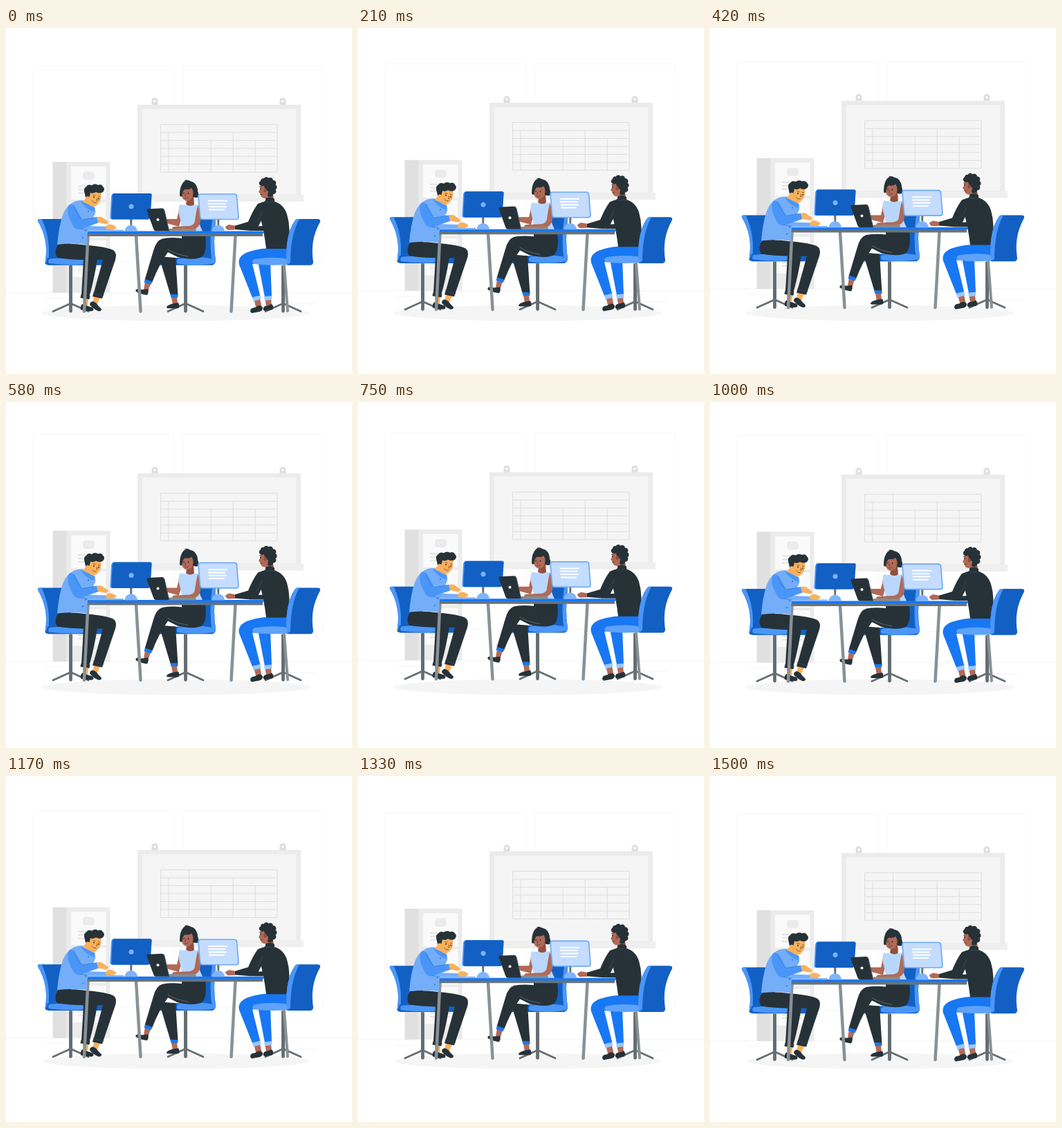
An HTML page that plays this animation: 500 px wide and 500 px high, repeating every 1.54 s.

```html
<!DOCTYPE html>
<html lang="en">
<head>
<meta charset="utf-8">
<title>Team at work</title>
<style>
html,body{margin:0;width:100%;height:100%;overflow:hidden;background:#fff}
svg{display:block;width:100vw;height:100vh}
.ink{fill:#263238}.deep{fill:#1260c3}.blue{fill:#1877f2}.mid{fill:#4a96f8}.soft{fill:#74adf8}.pale{fill:#b9d7fd}
.tan{fill:#f8b15d}.brown{fill:#b06a57}.dusk{fill:#91503f}.steel{fill:#68737a}
.line{fill:none;stroke-linecap:round;stroke-linejoin:round}
</style>
</head>
<body>
<svg viewBox="0 0 500 500">
<defs>
  <g id="foot" class="line" stroke="#646e73">
    <path d="M0 343V399" stroke-width="5" stroke-linecap="butt"/>
    <path d="M0 398L-25.500 409.500M0 398L25.500 409.500" stroke-width="2.800"/>
    <path d="M0 396V409" stroke-width="4.800"/>
  </g>
  <g id="hook">
    <path d="M-4.500 111V105.500a4.500 4.500 0 0 1 9 0V111Z" fill="#dedede"/>
    <circle cy="105.800" r="1.800" fill="#fff"/>
  </g>
  <g id="stand">
    <path d="M-1.500 272h3.500l-.5 17h-2.500Z" class="steel"/>
    <path d="M-9 294a9 9 0 0 1 18.500 0Z" fill="#80b4fb"/>
  </g>
</defs>
<rect width="500" height="500" fill="#fff"/>
<ellipse cx="245.500" cy="412" rx="193.500" ry="11.300" fill="#f5f5f5"/>
<g id="scene">
  <!-- room -->
  <g fill="none" stroke="#f8f8f8">
    <rect x="39" y="54.500" width="203.500" height="283" rx="3"/>
    <rect x="255" y="54.500" width="203.500" height="283" rx="3"/>
    <path d="M0 382.600H500" stroke="#f3f3f3"/>
    <path d="M56 390.500H84M407 398.500H448M188 394.500H206" stroke="#f5f5f5"/>
  </g>

  <!-- cabinet -->
  <path d="M67.500 193.500H88V382.500H67.500Z" fill="#e0e0e0"/>
  <path d="M87.500 193.500H150.500V382.500H87.500Z" fill="#ebebeb"/>
  <path d="M94 200h50.500v48H94ZM94 252h50.500v51H94ZM94 307h50.500v53H94Z" fill="#fafafa"/>
  <rect x="111" y="207.500" width="17" height="12" rx="4.500" fill="#ebebeb"/>
  <path d="M105 228.500h28M105 233.500h28M105 238.500h28M105 340h28M105 344.500h28M105 349.500h28" class="line" stroke="#e4e4e4" stroke-width="2"/>

  <!-- board -->
  <use href="#hook" x="215"/><use href="#hook" x="400"/>
  <path d="M190 110.800H426V242H190Z" fill="#ebebeb"/>
  <path d="M196.500 117H419.500V240.500H196.500Z" fill="#f5f5f5"/>
  <path d="M186 241H430V251H186Z" fill="#efefef"/>
  <path id="grid" fill="none" stroke="#dedede"/>

  <!-- left chair -->
  <use href="#foot" x="93.500"/>
  <path d="M49 276H82Q94 292 96 342H60Q55 342 57 336C60 316 57 298 46 279Q45 276 49 276Z" class="deep"/>
  <path d="M46 279Q45 276 49 276H51.500C61 296 64 316 61 340Q56 340 57 336C60 316 57 298 46 279Z" class="mid"/>
  <path d="M60 332H138Q144 334 143 342.800H61Q58 342 58 339Z" class="deep"/>
  <path d="M63 333.500Q88 330.500 110 333.500Q114 337 111 341.500Q86 343 62 340Q60 336 63 333.500Z" class="mid"/>

  <!-- middle chair -->
  <use href="#foot" x="259.500"/>
  <path d="M270 276H300Q304 276 303 280Q299 310 303 336Q303 341 298 342.800H222Q218 337 222 332H272Z" class="deep"/>
  <path d="M298 276H300Q304 276 303 280Q299 310 303 336Q303 340 298 341Q293 309 298 276Z" class="mid"/>
  <path d="M249 333.500Q274 329 296 333Q300 337 297 341Q272 344 248 340.500Q245 337 249 333.500Z" class="mid"/>

  <!-- left man, legs -->
  <path d="M110 384L120 386L118 401H112Z" class="tan"/>
  <path d="M127 388L136 390L131 401L125 398Z" class="tan"/>
  <path d="M110 399Q116 401 125 404Q128 407 125 409Q116 410 108 407Q107 402 110 399Z" class="ink"/>
  <path d="M125 395Q130 396 133 401L138 406Q138 410 133 409Q126 406 121 400Q121 396 125 395Z" class="ink"/>
  <path d="M76 312Q68 323 74 332Q94 335 112 335L109 386L120.500 388Q129 356 132 333Z" class="ink"/>
  <path d="M76 312Q97 311 118 314Q144 316 155 321Q161 325 158 335L140 388L126.500 384L140 335Q100 335 75 332Z" class="ink"/>
  <path d="M108.500 385L121.500 387L120.500 392L107.500 390ZM127 381L141 385L139 391L125 388Z" class="ink"/>
  <path d="M109 386L121 388M127 383L140 387" class="line" stroke="#46535a" stroke-width=".6"/>

  <!-- woman, legs -->
  <path d="M201 366L209 369L205.500 380L199 378Z" class="brown"/>
  <path d="M238.500 387L247 387L248 399L241 400Z" class="brown"/>
  <path d="M190 377Q196 379 205 377Q207 381 204 386Q195 385 188 381Q186 378 190 377Z" class="ink"/>
  <path d="M234 401Q239 398 249 397Q252 402 249 405H234Q230 404 234 401Z" class="ink"/>
  <path d="M221 330L238 387H248.500L245 332Z" class="ink"/>
  <path d="M254 300H288Q291 321 284 330Q274 337 248 331L234 324Q222 340 211 368L200.500 364L213 322Q217 307 226 304.500Q240 302 254 304Z" class="ink"/>
  <path d="M201 363L211.500 366.500L209.500 371L199.500 367.500ZM237.500 384.500L248 385L248.500 389.500H238.500Z" class="blue"/>
  <path d="M234 320Q245 327 263 330" class="line" stroke="#738087" stroke-width=".7"/>

  <!-- woman, body -->
  <path d="M251 257Q249 268 247 276L231 276Q229 281 235 283L250 287Q254 275 256 262Z" class="brown"/>
  <path d="M251 255Q263 257 278 255Q280 262 278 274Q279 287 288 300H254Q255 286 251 273Q248 264 251 255Z" class="pale"/>
  <path d="M268 224Q277 226 277 236Q279 241 278 244Q273 246 267 243Z" class="ink"/>
  <path d="M262 244H271L272 255Q267 259 260 255Z" class="dusk"/>
  <path d="M277 256Q283 268 281 280Q279 289 271 291L242 292Q238 290 242 287L266 286Q273 284 273 278L275 266Z" class="brown"/>
  <path d="M255 231H270Q272 237 270 243Q267 250 261 250Q254 248 253.500 240Q253 235 255 231Z" class="brown"/>
  <path d="M257 222Q262 219 267 221.500Q276 223 277 236Q279 242 277 244.500Q272 246 270 243Q272 237 268 231Q266 234 259 233Q255 234 254.500 243Q251 245 251 241Q251 228 257 222Z" class="ink"/>
  <path d="M265 222Q263 219.500 259 220.500" class="line" stroke="#263238" stroke-width="1.300"/>
  <path d="M257 238v1M263.500 238.500v1" class="line" stroke="#263238" stroke-width="1.400"/>
  <path d="M260 239.500l-1.500 3 1.500.3M258.500 245.500q3 1.500 5-.5" class="line" stroke="#6e3a2e" stroke-width=".8"/>

  <!-- right man, legs -->
  <use href="#foot" x="400.500"/>
  <path d="M402 343L407 409" class="line" stroke="#899196" stroke-width="4"/>
  <path d="M358 391H367L370 405L362 407Z" class="brown"/>
  <path d="M374 390H383L384 402H376Z" class="brown"/>
  <path d="M355 405Q361 404 365 401Q369 401 371 404Q371 409 366 410L355 412Q351 409 355 405Z" class="ink"/>
  <path d="M374 402Q380 401 384 399Q388 403 385 407L374 409Q369 406 374 402Z" class="ink"/>
  <path d="M364 337L374 389H384L382 337Z" class="blue"/>
  <path d="M408 318Q372 316 349 324Q334 330 337 342L356.500 391L367.500 388L356 341H408Z" class="blue"/>
  <path d="M356 389L367 386.500L368.500 392L357.500 395ZM373 388L384 387V392.500L374 394Z" fill="#9bc6ff"/>

  <!-- table -->
  <g class="line" stroke="#899196" stroke-width="4.500">
    <path d="M118.500 300L113 409.500M188 300L194.500 409.500M331.500 300L325.500 409.500"/>
  </g>
  <path d="M110 296.500H371V301H114Q110 301 110 296.500Z" class="steel"/>
  <rect x="102.500" y="293.500" width="270" height="3.700" rx="1.800" class="blue"/>

  <!-- left man, body -->
  <path d="M102 250Q118 246 127 260Q131 264 128 270L122 281Q117 290 117 313Q96 310 74 313Q76 288 82 270Q89 253 102 250Z" class="soft"/>
  <path d="M115 246L127 252L128 261Q116 261 111 251Z" class="tan"/>
  <path d="M108 250Q118 254 129 260L127 266Q113 260 108 250Z" class="mid"/>
  <path d="M118 286L146 287L147 292L118 293Z" class="soft"/>
  <path d="M144 287Q148 282.500 153 284L159 287Q161 290 153 292H145Z" class="tan"/>
  <path d="M91 256Q97 252 102 262L110 277L132 273L135 281L107 291Q99 292 95 282Q86 265 91 256Z" class="mid"/>
  <path d="M131 274Q137 271 141 275L148 280Q147 284 142 283L133 281Z" class="tan"/>
  <path d="M98 257Q102 270 110 277L128 274M107 290L118 292" class="line" stroke="#3077d2" stroke-width=".7"/>
  <path d="M119 265v.1M115 293v.1M111 303v.1" class="line" stroke="#1260c3" stroke-width="1.700"/>
  <path d="M118 236Q126 232 137 238Q139 247 134 253Q128 261 121 256Q114 249 118 236Z" class="tan"/>
  <path d="M114 240Q111 231 116 229.500Q118 225 124 227.500Q128 224 133 227Q138 225 140 229Q144 233 140 237Q136 240 130 237Q126 240 122 238Q121 244 119 247Q115 248 114 240Z" class="ink"/>
  <circle cx="118" cy="246" r="2.800" class="tan"/>
  <path d="M127 244v1M134 246v1" class="line" stroke="#263238" stroke-width="1.500"/>
  <path d="M126 241.500l3 .5M133.500 243l2 .7M131 246l1 3-1.500.3M124.500 250q3 4 6 2.500" class="line" stroke="#70421f" stroke-width=".8"/>
  <rect x="118" y="291.500" width="52" height="2.400" rx="1" fill="#83b8fd"/>

  <!-- right man, body -->
  <path d="M374 250Q379 246 386 250Q401 254 406 269Q412 289 408 319H376Q373 294 368 276Q364 259 374 250Z" class="ink"/>
  <path d="M372 251Q378 255 374 268L364 288Q361 293 354 293L330 291V286L350 280Q357 263 364 254Z" class="ink"/>
  <path d="M354 287L372 286V293H357Z" class="ink"/>
  <path d="M331 285.500V291.500L321 292Q317 290 317 287L322 284Z" class="brown"/>
  <path d="M375 237H385L387 247L376 248Z" class="dusk"/>
  <path d="M375 246Q381 243 388 247V252Q381 250 375 252Z" class="ink"/>
  <path d="M368 225Q378 221 383 231L381 243Q375 249 369 244L367 239L365 237L367 233Z" class="brown"/>
  <path d="M367 227a3.500 3.500 0 0 1 1-6a3.500 3.500 0 0 1 4.500-3.500a4 4 0 0 1 7-.5a4 4 0 0 1 6.500 3a4 4 0 0 1 3.500 6.500a4 4 0 0 1 0 7a4 4 0 0 1-3 6.500Q384 246 378 243L379 236Q374 234 373 228Q369 229 367 227Z" class="ink"/>
  <ellipse cx="374.500" cy="234.500" rx="2.200" ry="3" class="dusk"/>
  <path d="M368 232v1" class="line" stroke="#263238" stroke-width="1.400"/>
  <path d="M366.500 229.500h2.500M367.500 240.500h3" class="line" stroke="#55312a" stroke-width=".8"/>
  <path d="M363 280Q368 273 370 265M376 252Q382 250 388 252" class="line" stroke="#435158" stroke-width=".7"/>

  <!-- right chair -->
  <path d="M421 276H450Q455 276 454 280C443 300 441 318 444 338Q444 342 440 342.800H407Q404 342 405 337Q404 298 417 279Z" class="deep"/>
  <path d="M421 276H424Q411 299 411 339L407 342Q404 341 405 336Q404 298 417 279Q418 276 421 276Z" class="mid"/>
  <path d="M359 334Q382 330 404 333Q408 337 405 342Q380 344 358 341Q354 337 359 334Z" fill="#5ea2fa"/>

  <!-- desk gear -->
  <use href="#stand" x="180.500"/>
  <path d="M156 239H208Q211 239 210.500 242L208.500 273Q208 276.500 205 276.500H153Q150 276.500 150.500 273L152 243Q153 239 156 239Z" class="mid"/>
  <path d="M157 239H208Q211 239 210.500 242L208.500 273Q208 276.500 205 276.500H155Q152 276.500 152.300 273L153.800 243Q154 239 157 239Z" class="deep"/>
  <circle cx="181" cy="258" r="3.500" fill="#7bb2fa"/>
  <path d="M236 290H274Q276 293 273 294H234Z" fill="#858d91"/>
  <path d="M205 261.500L226 260.500Q228 260.500 229 263L236 293.500H217Q214 293.500 213 290L203.500 264Q203 261.500 205 261.500Z" class="ink"/>
  <path d="M226 261Q228 261 229 264L235.500 292.500" class="line" stroke="#56636a" stroke-width=".8"/>
  <circle cx="219.500" cy="277" r="2" fill="#fff"/>
  <use href="#stand" x="306.500"/>
  <path d="M281 240H330Q333 240 333.500 243L336 273Q336 276.500 333 276.500H284Q281 276.500 280.500 273L278 243Q278 240 281 240Z" fill="#c4dcff" stroke="#6caaf9" stroke-width="1.700"/>
  <path d="M293 249.700H319M292.500 254H316.500M293.500 258.300H318M294 262.600H315" class="line" stroke="#fff" stroke-width="2"/>
</g>
</svg>
<script>
const LOOP = 1540, RISE = 10, LEAD = 40;
const scene = document.getElementById("scene");

// Table on the wall: [x, first row] of each column rule
const ROW = 11.5, TOP = 139.3;
const cols = [[223.5, 0], [235, 1], [264.5, 0], [296.2, 2], [328.2, 1], [360.2, 2], [392, 0]];
let grid = "";
for (let i = 0; i < 7; i++) grid += `M223.5 ${TOP + ROW * i}H392`;
for (const [x, row] of cols) grid += `M${x} ${TOP + ROW * row}V${TOP + ROW * 6}`;
document.getElementById("grid").setAttribute("d", grid);

// Steady float up and back down
const lift = t => RISE * (1 - Math.abs(1 - 2 * ((t + LEAD) % LOOP) / LOOP));

function draw(t) {
  scene.setAttribute("transform", `translate(0 ${(lift(0) - lift(t)).toFixed(3)})`);
}

let start;
function tick(now) {
  start ??= now;
  draw(now - start);
  requestAnimationFrame(tick);
}
draw(0);
requestAnimationFrame(tick);
</script>
</body>
</html>
```
